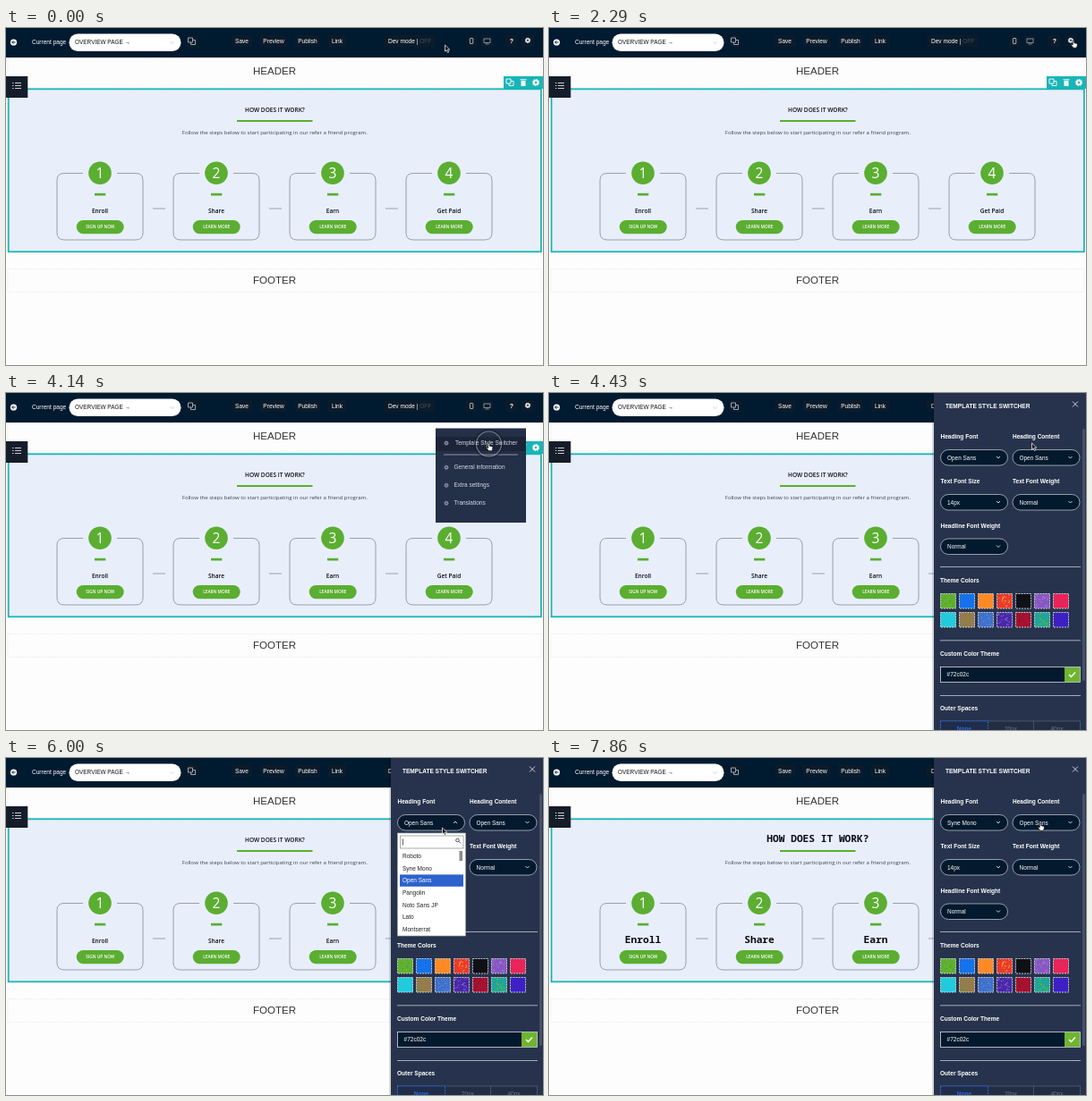
An HTML page for the animation above (8000 ms loop, 600x377 px).

```html
<!DOCTYPE html>
<html lang="en">
<head>
<meta charset="utf-8">
<title>Template style switcher</title>
<style>
  html, body { margin: 0; width: 100%; height: 100%; overflow: hidden; background: #fdfdfe; }
  svg { display: block; width: 100vw; height: 100vh; }
  text { font-family: "Liberation Sans", Arial, sans-serif; font-size: 6.55px; white-space: pre; }
  .open { font-family: "Open Sans", sans-serif; }
  .title { font-family: "Open Sans", sans-serif; font-weight: 600; fill: #080c14; }
  .mono .title { font-family: "Noto Sans Mono", "DejaVu Sans Mono", monospace; font-size: 11.2px; }
  .mid { text-anchor: middle; }
  .bold { font-weight: 700; }
</style>
</head>
<body>
<svg id="stage" viewBox="0 0 600 377" preserveAspectRatio="none"></svg>
<script>
const GREEN = '#5bae31', TEAL = '#19b5b7', NAVY = '#001a30', PANEL = '#27334c', INK = '#03192d';
const LOOP = 8000, STEP = LOOP / 56;

// Markup helpers
const rect = (x, y, w, h, fill, more = '') =>
  `<rect x="${x}" y="${y}" width="${w}" height="${h}" fill="${fill}" ${more}/>`;
const text = (x, y, s, fill = '#fff', cls = '', size) =>
  `<text x="${x}" y="${y}" fill="${fill}" class="${cls}"${size ? ` style="font-size:${size}px"` : ''}>${s}</text>`;
const title = (x, y, s, size) => `<text x="${x}" y="${y}" class="title mid" font-size="${size}" ` +
  `>${s}</text>`;
const line = (d, stroke, width = 1, more = '') =>
  `<path d="${d}" fill="none" stroke="${stroke}" stroke-width="${width}" ${more}/>`;
const circle = (x, y, r, fill, more = '') => `<circle cx="${x}" cy="${y}" r="${r}" fill="${fill}" ${more}/>`;
const group = (id, body) => `<g id="${id}">${body}</g>`;
const chevron = (x, y, color, up) => line(`M${x - 2} ${y + (up ? 1 : -1)}l2 ${up ? -2 : 2}l2 ${up ? 2 : -2}`, color, .9);
const gear = (x, y, r, color) =>
  circle(x, y, r * .6, 'none', `stroke="${color}" stroke-width="${r * .55}"`) +
  circle(x, y, r * .88, 'none', `stroke="${color}" stroke-width="${r * .35}" stroke-dasharray="${r * .345}"`);
const copies = (x, y, color) => line(`M${x} ${y}h5v5h-5zM${x + 5} ${y + 2.5}h3v5h-5v-2.5`, color, .9);

function topBar() {
  const buttons = [[252, 23, 'Save'], [284, 30, 'Preview'], [323, 28, 'Publish'], [360, 20, 'Link']];
  const tile = (x, w) => rect(x, 8, w, 13, '#0c1b2a', 'rx="1"');
  return rect(0, 0, 600, 33, NAVY) +
    circle(8.5, 16, 3.6, '#fff') + line('M10.7 16h-4M8.4 14.2l-1.8 1.8l1.8 1.8', NAVY, .9) +
    text(29, 18.2, 'Current page') +
    rect(70.5, 6.5, 125, 19.5, '#fff', 'rx="9.7"') +
    text(77, 18.2, 'OVERVIEW PAGE →', '#111', '', 6.45) + chevron(185.5, 16.5, '#ccd', false) +
    tile(202, 12) + copies(203.5, 11, '#a9b4c0') +
    buttons.map(([x, w, s]) => tile(x, w) + text(x + w / 2, 16.8, s, '#fff', 'mid')).join('') +
    tile(422, 57) + text(427, 16.8, 'Dev mode | <tspan fill="#43505d">OFF</tspan>') +
    tile(514, 12) + tile(531, 13) + tile(558, 13) + tile(576, 14) +
    rect(518.4, 11.5, 3.4, 6, 'none', 'rx=".6" stroke="#ccd4dc" stroke-width=".8"') +
    rect(534, 12, 7, 4.5, 'none', 'stroke="#9ba8b4" stroke-width=".8"') + line('M535.5 18h4', '#9ba8b4', .8) +
    text(565, 17, '?', '#fff', 'mid bold', 7) + gear(583, 13.8, 3, '#dfe5ea');
}

function card(x, n, name, label) {
  return line(`M${x - 19} 162.5h-21q-8 0 -8 8v58.500q0 8 8 8h80q8 0 8 -8v-58.500q0 -8 -8 -8h-21`, '#858c98', .8) +
    circle(x, 162.3, 12.8, GREEN) + text(x, 168, n, '#fff', 'open mid', 15.5) +
    rect(x - 6, 184.8, 12.3, 2.7, GREEN) + title(x, 206.500, name, 12) +
    rect(x - 26.3, 215, 53, 15.2, GREEN, 'rx="7.6"') +
    `<text x="${x + .3}" y="224.400" fill="#fff" class="open mid" style="font-size:4.75px;font-weight:600">${label}</text>`;
}

function page() {
  const cards = ['Enroll', 'Share', 'Earn', 'Get Paid'];
  const dotted = 'stroke="#e3e3e6" stroke-width=".7" stroke-dasharray="1 1"';
  return rect(0, 0, 600, 377, '#fdfdfe') +
    rect(2, 33.5, 596, 33, '#fdfdfe', dotted) + text(300, 52, 'HEADER', '#333', 'mid', 11.5) +
    rect(2.7, 68.3, 595.2, 182, '#e8effb', `stroke="${TEAL}" stroke-width="1.8"`) +
    title(300.4, 94, 'HOW DOES IT WORK?', 11.8) + rect(258, 103, 84.5, 2, GREEN) +
    text(300.3, 118.8, 'Follow the steps below to start participating in our refer a friend program.', '#3c424c', 'open mid', 6.05) +
    cards.map((s, i) => card(105 + 130 * i, i + 1, s, i ? 'LEARN MORE' : 'SIGN UP NOW') +
      (i < 3 ? line(`M${164 + 130 * i} 202h14`, '#858c98', .8) : '')).join('') +
    rect(2, 269.5, 596, 26, '#fdfdfe', dotted) + text(300, 285.5, 'FOOTER', '#333', 'mid', 11.5) +
    rect(556, 54, 44, 14, TEAL) + copies(559, 57, '#fff') +
    rect(575.5, 59, 5, 6, '#fff', 'rx=".6"') + rect(574.5, 57.3, 7, 1, '#fff') + gear(592, 61, 3.8, '#fff') +
    rect(0, 54, 24.3, 24, '#161d2a') +
    line('M7 61.500h1.500M7 64.500h1.500M7 67.500h1.500M10 61.500h7M10 64.500h7M10 67.500h7', '#dce1e8', .9);
}

function menu() {
  const items = [[58, 'Template Style Switcher'], [85.3, 'General information'], [105.3, 'Extra settings'], [125.2, 'Translations']];
  return rect(480, 39.5, 101, 105.5, '#242f48') + rect(480, 49, 101, 16, '#1c2438') +
    line('M489 69h83', '#a7aebc', .8) +
    items.map(([y, s], i) => gear(492, y - 2, 2.5, '#7f8aa3') + text(i ? 500.500 : 502, y, s, '#d6dbe5', '', 6.5)).join('');
}

const select = (x, y, value, id = '') =>
  rect(x + .5, y + .5, 75, 17.5, INK, 'rx="8.8" stroke="#b4bdc9" stroke-width=".8"') +
  `<text x="${x + 8}" y="${y + 11.5}" fill="#fff" style="font-size:6.45px" id="${id}">${value}</text>` +
  (id ? group('down', chevron(x + 65, y + 9, '#dfe5ec', false)) + group('up', chevron(x + 65, y + 9, '#dfe5ec', true))
      : chevron(x + 65, y + 9, '#dfe5ec', false));

// Small seeded generator for the speckled swatches
let seed = 7;
const random = () => (seed = seed * 16807 % 2147483647) / 2147483647;

function swatch(color, speck, i) {
  const x = 437 + 21 * (i % 7), y = i < 7 ? 224 : 245;
  let dots = '';
  for (let k = 0; speck && k < 18; k++)
    dots += circle(x + 1.5 + random() * 14, y + 1.5 + random() * 14, .7, speck);
  return rect(x + .5, y + .5, 17, 16.5, color) + dots +
    rect(x + .5, y + .5, 17, 16.5, 'none', 'stroke="#e7ebf2" stroke-width=".8" stroke-dasharray="2 1"');
}

function panel() {
  const label = (x, y, s) => text(x, y, s, '#fff', 'bold');
  const rule = y => line(`M437 ${y}h157`, '#c5cbd5', .8);
  const colors = [
    ['#62b22e', '#4f9d45'], ['#1672ea'], ['#ff8a25'], ['#ea3a2c', '#f09a35'], ['#101114'], ['#8658c4', '#b878c0'], ['#e82458'],
    ['#22cbdc'], ['#9a7a4c', '#5a9a48'], ['#3f70cc', '#5d8bd0'], ['#4a27a8', '#8470d0'], ['#a81230', '#7d1530'], ['#20a59a', '#66b83a'], ['#3c20c4']
  ];
  return rect(428, 0, 2, 377, '#000', 'opacity=".15"') + rect(430, 0, 171, 377, PANEL) +
    rect(596, 40, 3, 282, '#475268', 'rx="1.5"') +
    label(443, 17, 'TEMPLATE STYLE SWITCHER') + line('M585 9.500l6 6m0 -6l-6 6', '#dce1e9', .9) +
    label(437.500, 50.700, 'Heading Font') + label(518, 50.700, 'Heading Content') +
    label(437.500, 101, 'Text Font Size') + label(518, 101, 'Text Font Weight') +
    label(437.500, 150.700, 'Headline Font Weight') +
    select(437, 63, 'Open Sans', 'font') + select(517.500, 63, 'Open Sans') +
    select(437, 113, '14px') + select(517.500, 113, 'Normal') + select(437, 162.500, 'Normal') +
    rule(194.500) + label(437, 212, 'Theme Colors') + colors.map(([c, s], i) => swatch(c, s, i)).join('') +
    rule(276.800) + label(437, 294, 'Custom Color Theme') +
    rect(437.500, 306.500, 156, 17, INK, 'stroke="#d5dae2" stroke-width=".8"') + text(444.500, 317.300, '#72c02c') +
    rect(576, 307, 17, 16, '#6fb52f') + line('M581 315l2.500 2.500l4.500 -5', '#fff', 1.5) +
    rule(338.500) + label(437, 355.200, 'Outer Spaces') +
    rect(437.500, 367, 156, 14, '#222d44', 'stroke="#596479" stroke-width=".7"') + line('M541.500 367v10', '#596479', .7) +
    rect(437.500, 367, 53, 14, '#1f2d4b', 'stroke="#2c63cf" stroke-dasharray="2 1"') +
    text(464, 378.300, 'None', '#2d68d8', 'mid bold') +
    text(516, 378.300, '20px', '#68738a', 'mid') + text(567.500, 378.300, '40px', '#68738a', 'mid');
}

const FONTS = ['Roboto', 'Syne Mono', 'Open Sans', 'Pangolin', 'Noto Sans JP', 'Lato', 'Montserrat'];
const ROW = 13.7, LIST_TOP = 103;
function dropdown() {
  return rect(437.500, 84, 76, 115, '#fff', 'stroke="#a3a9b5" stroke-width=".7"') +
    rect(440.500, 87, 70.500, 14, '#fff', 'stroke="#888" stroke-width=".7"') + line('M443.500 90.500v7', '#222', .7) +
    circle(504.500, 92, 1.8, 'none', 'stroke="#444" stroke-width=".9"') + line('M506 93.500l2 2', '#444', 1) +
    rect(440, 0, 71, 13.4, '#2d62cc', 'id="highlight"') +
    FONTS.map((s, i) => `<text class="row" x="443" y="${111.9 + ROW * i}" style="font-size:6.5px">${s}</text>`).join('') +
    rect(506.500, 104, 3.500, 11, '#8c8c8c');
}

const pointer =
  group('arrow', '<path d="M0 0v7.200l1.700 -1.500l1.300 2.800l1.300 -.6l-1.300 -2.700h2.300z" fill="#111" stroke="#fff" stroke-width=".7"/>') +
  group('hand', '<path d="M-.8 .4q.8 -.9 1.600 0v2.800l3 .7q.7 .2 .6 1l-.5 2.600l-.7 1.200h-3.400l-2.500 -3.400q.3 -1 1.900 .2z" fill="#fff" stroke="#111" stroke-width=".7"/>');

const stage = document.getElementById('stage');
stage.innerHTML = group('page', page()) + topBar() + group('menu', menu()) +
  group('panel', panel() + group('dropdown', dropdown())) +
  group('ring', circle(0, 0, 13.500, 'none', 'stroke="#10141c" stroke-width="1.800"') +
    circle(0, 0, 12.200, 'none', 'stroke="#f1f3f6" stroke-width="1"')) +
  group('cursor', pointer);

const el = id => document.getElementById(id);
const parts = Object.fromEntries(
  ['page', 'menu', 'panel', 'dropdown', 'ring', 'cursor', 'arrow', 'hand', 'highlight', 'font', 'up', 'down'].map(id => [id, el(id)]));
const rows = [...document.querySelectorAll('.row')];
const show = (node, on) => node.setAttribute('display', on ? 'inline' : 'none');
const move = (node, x, y, scale = 1) => node.setAttribute('transform', `translate(${x} ${y}) scale(${scale})`);

// Pointer stops: time, x, y
const PATH = [[0, 490.5, 19], [140, 490.5, 19], [290, 493, 19], [500, 493, 19], [1600, 586, 13.5], [2860, 586, 13.5],
  [3700, 539.5, 56], [4430, 539.5, 56], [5140, 487.5, 78], [6000, 487.5, 78], [6700, 467, 121.5], [7130, 467, 121.5], [7850, 549, 72.5]];
const CLICKS = [2420, 3700, 5280, 6990];
const OPEN_MENU = 2560, OPEN_PANEL = 4140, OPEN_LIST = 5420, PICK = 7130;
const ease = k => k * k * (3 - 2 * k);

function pointerAt(t) {
  const i = PATH.findIndex(p => p[0] > t);
  if (i < 0) return PATH[PATH.length - 1].slice(1);
  const [t0, x0, y0] = PATH[i - 1], [t1, x1, y1] = PATH[i], k = ease((t - t0) / (t1 - t0));
  return [x0 + (x1 - x0) * k, y0 + (y1 - y0) * k];
}

function draw(t) {
  const [x, y] = pointerAt(t);
  const menuOpen = t >= OPEN_MENU && t < OPEN_PANEL, panelOpen = t >= OPEN_PANEL;
  const listOpen = t >= OPEN_LIST && t < PICK, picked = t >= PICK;
  show(parts.menu, menuOpen);
  show(parts.panel, panelOpen);
  show(parts.dropdown, listOpen);
  show(parts.up, listOpen);
  show(parts.down, !listOpen);
  move(parts.panel, 170 * Math.max(0, 1 - (t - OPEN_PANEL + 150) / 430) ** 2, 0);

  const over = Math.floor((y - LIST_TOP) / ROW), active = over >= 0 ? over : 2;
  parts.highlight.setAttribute('y', LIST_TOP + ROW * active);
  rows.forEach((row, i) => row.setAttribute('fill', i === active ? '#fff' : '#222'));
  parts.font.textContent = FONTS[picked ? 1 : 2];
  parts.page.setAttribute('class', picked ? 'mono' : '');

  const age = t - (CLICKS.filter(c => c <= t).pop() ?? -LOOP);
  show(parts.ring, age < 430);
  parts.ring.setAttribute('opacity', age < 280 ? 1 : .4);
  move(parts.ring, x, y + 1, Math.min(1.15, .55 + age / 320));

  const onGear = !panelOpen && x > 577 && y < 22;
  const onMenu = menuOpen && x < 581 && y > 49;
  const onSelect = panelOpen && !listOpen && y > 63 && y < 81 && (x < 513 || x > 518);
  const hand = onGear || onMenu || onSelect || (listOpen && over >= 0);
  show(parts.hand, hand);
  show(parts.arrow, !hand);
  move(parts.cursor, x, y);
}

const start = performance.now();
function tick() {
  const t = (performance.now() - start) % LOOP;
  draw(Math.floor(t / STEP) * STEP);
  requestAnimationFrame(tick);
}
tick();
</script>
</body>
</html>
```
